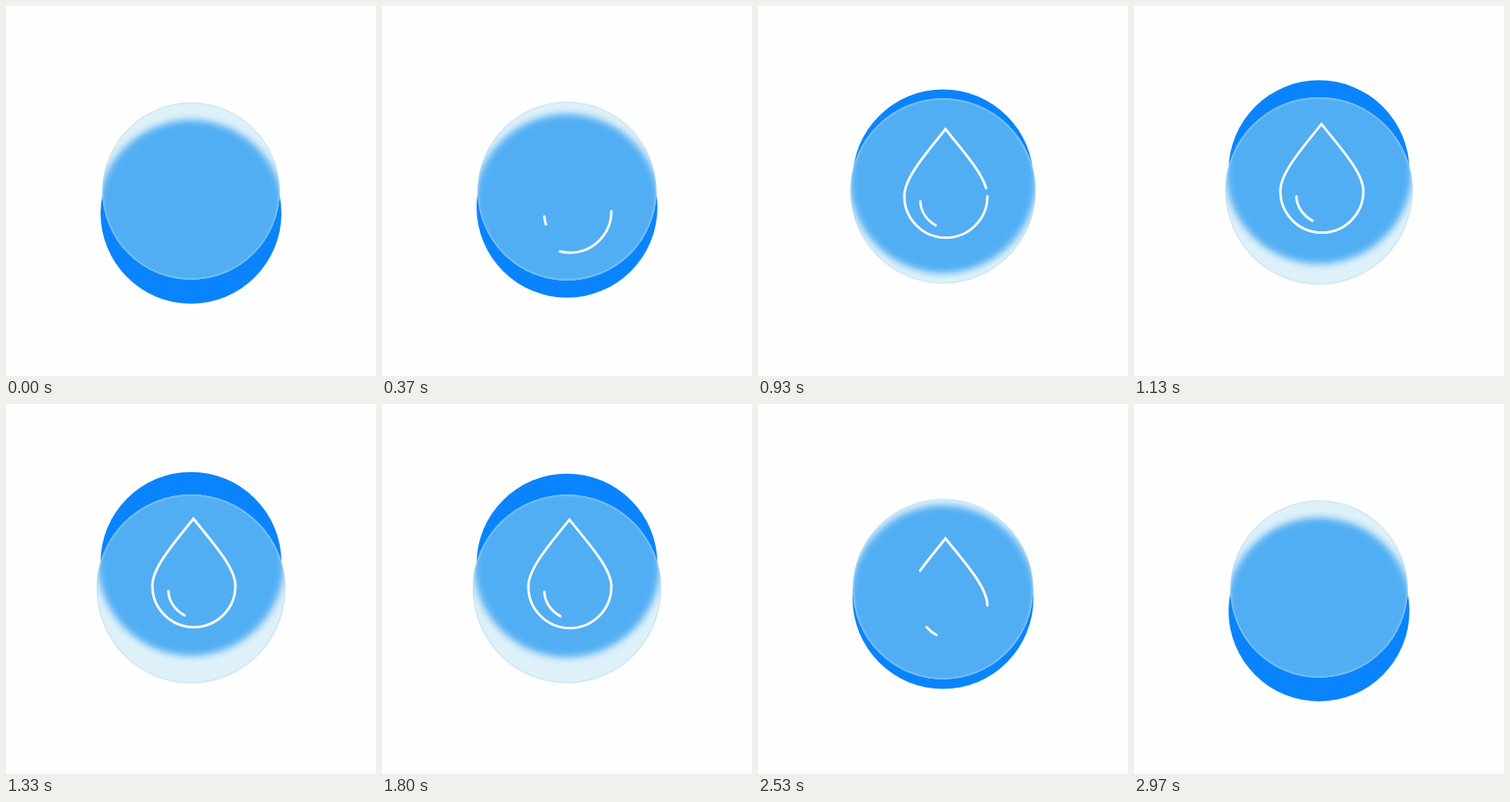
Animation, 450 px wide and 450 px high, one loop 3.01 s. Source, as an HTML page:

```html
<!DOCTYPE html>
<html lang="en">
<head>
<meta charset="utf-8">
<title>Water drop</title>
<style>
  html, body { margin: 0; width: 100%; height: 100%; overflow: hidden; background: #fefefe; }
  svg { display: block; width: 100%; height: 100%; }
  .line { fill: none; stroke: #fff; stroke-width: 3; stroke-linecap: round; stroke-linejoin: miter; }
</style>
</head>
<body>
<svg viewBox="0 0 450 450">
  <defs>
    <clipPath id="lens"><circle class="glass" cx="225" cy="225"/></clipPath>
    <filter id="soft" x="-20%" y="-20%" width="140%" height="140%" color-interpolation-filters="sRGB">
      <feGaussianBlur stdDeviation="4.5"/>
    </filter>
  </defs>
  <circle class="ball" cx="225" r="110" fill="#0a84fc"/>
  <circle class="glass" cx="225" cy="225" fill="#def1f9"/>
  <g clip-path="url(#lens)">
    <circle class="ball" cx="225" r="113.5" fill="#52aef3" filter="url(#soft)"/>
  </g>
  <circle id="rim" cx="225" cy="225" fill="none" stroke="#b4d7eb" stroke-opacity=".3" stroke-width="2"/>
  <g id="drop">
    <path class="line" pathLength="100"
      d="M279 81.5 A50.5 50.5 0 0 1 178 81.5 C178 59 205 29 228 0 C251 29 279 59 279 81.5"/>
    <path class="line" pathLength="100" d="M197.5 88 C198 100 205 111 217 117.5"/>
  </g>
</svg>
<script>
  const LOOP = 3010, CYCLE = 90, LAST = 88;
  const all = s => [...document.querySelectorAll(s)];
  const balls = all('.ball'), glass = all('.glass'), lines = all('.line');
  const rim = document.getElementById('rim');
  const drop = document.getElementById('drop');

  // 30 steps per second, on a 10 ms clock, after a short hold
  const stepAt = ms => Math.min(LAST, Math.max(0, Math.ceil((Math.floor(ms / 10) * 10 - 60) * 3 / 100)));

  const ease = (n, from, to) => {
    const p = Math.min(1, Math.max(0, (n - from) / (to - from)));
    return p * p * (3 - 2 * p);
  };

  function draw(n) {
    const wave = Math.cos(2 * Math.PI * n / CYCLE);
    const r = 111.6 - 3.7 * wave;
    balls.forEach(b => b.setAttribute('cy', 221 + 31 * wave));
    glass.forEach(g => g.setAttribute('r', r));
    rim.setAttribute('r', r - 1);
    drop.setAttribute('transform', `translate(0 ${155 + 17 * wave})`);

    const start = 100 * ease(n, 60, 87), end = 100 * ease(n, 0, 30);
    const length = end - start;
    drop.style.display = length > 0 ? '' : 'none';
    lines.forEach(l => {
      l.style.strokeDasharray = length < 100 ? `${length} 200` : 'none';
      l.style.strokeDashoffset = -start;
    });
  }

  const t0 = performance.now();
  function tick() {
    draw(stepAt((performance.now() - t0) % LOOP));
    requestAnimationFrame(tick);
  }
  tick();
</script>
</body>
</html>
```
